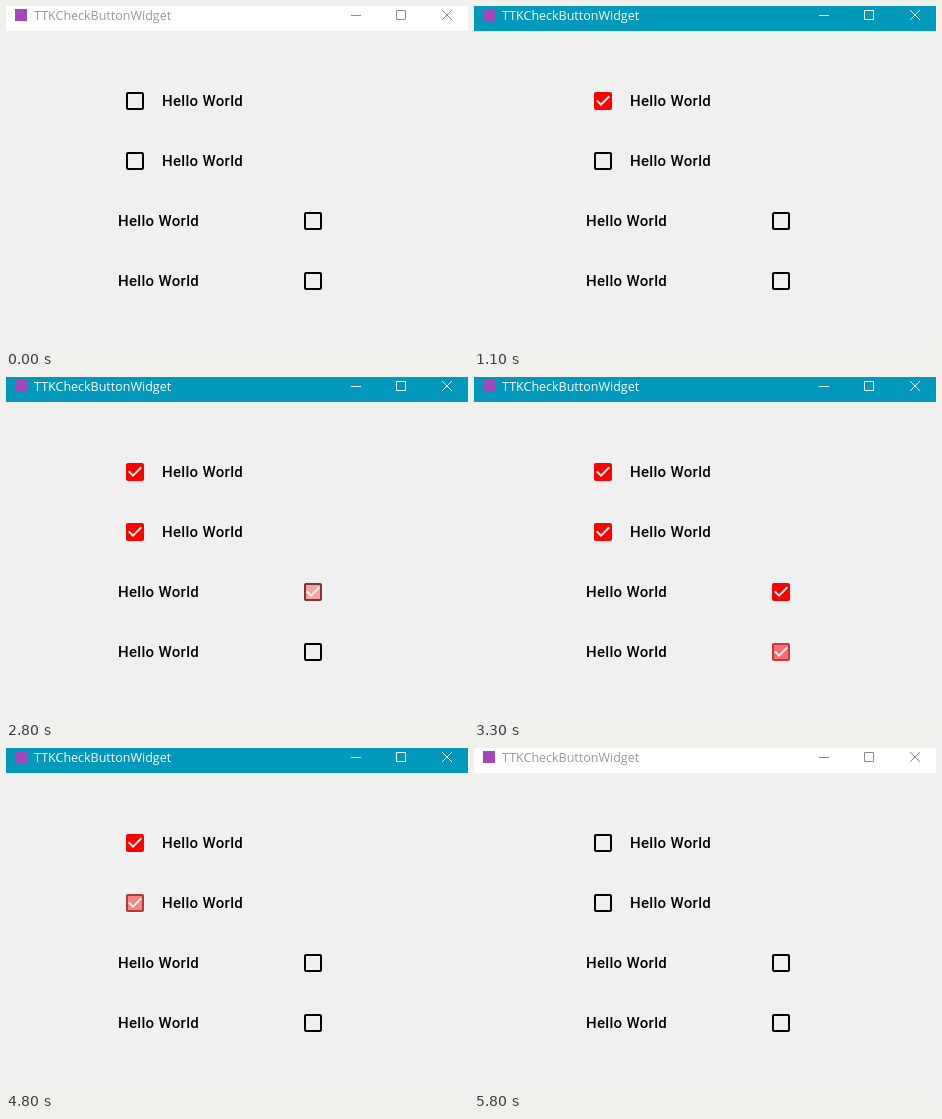
Recreate the animation shown at these times as an HTML page. Size 462 px wide and 343 px high, loop 5900 ms.

```html
<!DOCTYPE html>
<html lang="en">
<head>
<meta charset="utf-8">
<title>TTKCheckButtonWidget</title>
<style>
  html, body { margin: 0; width: 100%; height: 100%; overflow: hidden; background: #f0f0f0; }
  svg { display: block; width: 462px; height: 343px; }
  .title { font: 12.5px "Open Sans", "Noto Sans", sans-serif; }
  .label { font: 500 15px Roboto, sans-serif; letter-spacing: .3px; }
</style>
</head>
<body>
<svg id="stage" viewBox="0 0 462 343" xmlns="http://www.w3.org/2000/svg">
  <defs>
    <path id="empty" d="M19 5v14H5V5h14m0-2H5c-1.1 0-2 .9-2 2v14c0 1.1.9 2 2 2h14c1.1 0 2-.9 2-2V5c0-1.1-.9-2-2-2z"/>
    <path id="ticked" fill="#f00" d="M19 3H5c-1.11 0-2 .9-2 2v14c0 1.1.89 2 2 2h14c1.11 0 2-.9 2-2V5c0-1.1-.89-2-2-2zm-9 14l-5-5 1.41-1.41L10 14.17l7.59-7.59L19 8l-9 9z"/>
  </defs>
  <rect width="462" height="343" fill="#f0f0f0"/>
  <rect id="bar" width="462" height="25"/>
  <rect x="9" y="3" width="12" height="12" fill="#a347ba"/>
  <text id="title" class="title" x="28" y="14">TTKCheckButtonWidget</text>
  <g id="controls" fill="none">
    <path d="M345 9.5h10M390.5 4.5h9v9h-9z"/>
    <path d="M436 4l10 10M446 4l-10 10"/>
  </g>
</svg>
<script>
const LOOP = 5900, STEP = 100;
const NS = "http://www.w3.org/2000/svg";
const stage = document.getElementById("stage");
const bar = document.getElementById("bar");
const title = document.getElementById("title");
const controls = document.getElementById("controls");

// on / off: start and end of each fade in ms
const rows = [
  { icon: 117, text: 156, y: 83,  on: [670, 1100],  off: [4960, 5400] },
  { icon: 117, text: 156, y: 143, on: [1300, 1700], off: [4560, 5000] },
  { icon: 295, text: 112, y: 203, on: [2660, 3100], off: [3960, 4400] },
  { icon: 295, text: 112, y: 263, on: [3060, 3500], off: [3660, 4100] }
];

function add(tag, attrs) {
  const el = document.createElementNS(NS, tag);
  for (const key in attrs) el.setAttribute(key, attrs[key]);
  return stage.appendChild(el);
}

for (const row of rows) {
  row.empty = add("use", { href: "#empty", x: row.icon, y: row.y });
  row.ticked = add("use", { href: "#ticked", x: row.icon, y: row.y });
  add("text", { class: "label", x: row.text, y: row.y + 17 }).textContent = "Hello World";
}

const ramp = (t, [from, to]) => Math.min(1, Math.max(0, (t - from) / (to - from)));

function draw(ms) {
  const t = Math.floor((ms % LOOP) / STEP) * STEP;
  const active = t >= 700 && t < 5800;
  bar.setAttribute("fill", active ? "#0099bc" : "#fff");
  title.setAttribute("fill", active ? "#fff" : "#999");
  controls.setAttribute("stroke", active ? "#fff" : "#8c8c8c");
  for (const row of rows) {
    const amount = ramp(t, row.on) - ramp(t, row.off);
    row.ticked.setAttribute("opacity", amount);
    row.empty.setAttribute("opacity", 1 - amount);
  }
}

const start = performance.now();
function tick() {
  draw(performance.now() - start);
  requestAnimationFrame(tick);
}
draw(0);
requestAnimationFrame(tick);
</script>
</body>
</html>
```
